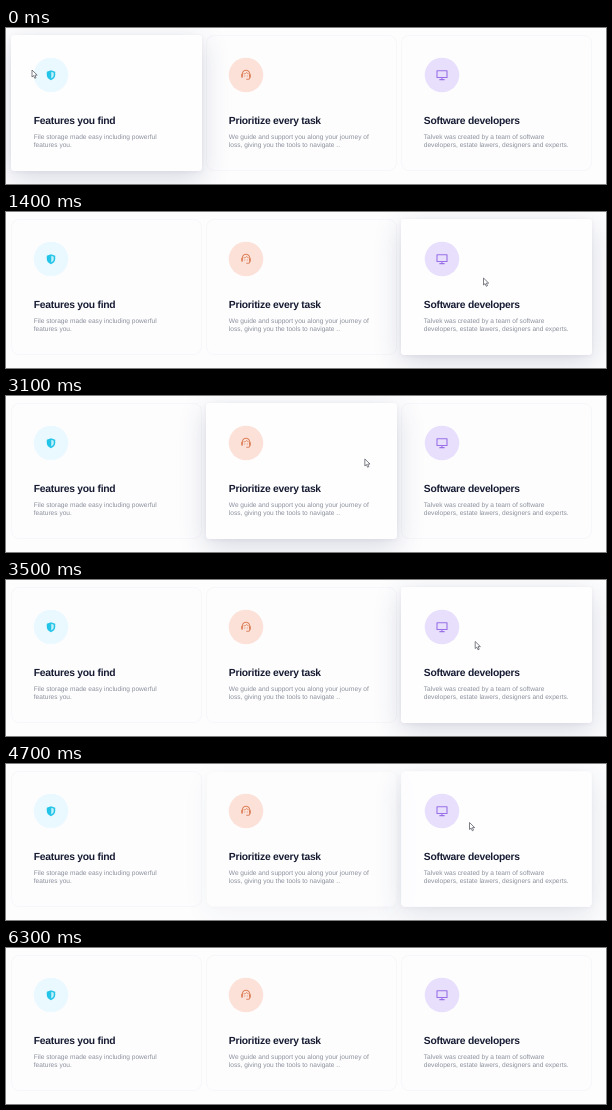
Recreate the animation shown at these times as an HTML page. Size 600 by 156 pixels, loop 6700 ms.

```html
<!DOCTYPE html>
<html lang="en">
<head>
<meta charset="utf-8">
<title>Feature cards</title>
<style>
  html, body { margin: 0; width: 100%; height: 100%; overflow: hidden; background: #fdfdfe; }
  .stage { position: relative; width: 600px; height: 156px; overflow: hidden; }
  .card { position: absolute; top: 7px; width: 191px; height: 136px; box-sizing: border-box; }
  svg { position: absolute; inset: 0; z-index: 20; }
  text { font-family: "Liberation Sans", Arial, sans-serif; text-rendering: geometricPrecision; }
  .title { font-size: 10.3px; font-weight: 700; letter-spacing: -.25px; fill: #171c33; }
  .body { font-size: 6.58px; fill: #8b909b; }
</style>
</head>
<body>
<div class="stage">
  <svg width="600" height="156" viewBox="0 0 600 156">
    <g id="copy"></g>
    <g transform="translate(45 47)">
      <circle r="17.3" fill="#eaf8ff"/>
      <g transform="scale(.9)">
        <path d="M0-5.3 4.7-3.5V0C4.7 2.8 2.6 4.7 0 5.7-2.6 4.7-4.7 2.8-4.7 0V-3.5Z" fill="#22c5e8"/>
        <path d="M.3-3.5 3-2.4V0C3 1.9 1.9 3 .3 3.8Z" fill="#c4f0fb"/>
      </g>
    </g>
    <g transform="translate(240 47)">
      <circle r="17.3" fill="#fce1d8"/>
      <g transform="scale(.9)" fill="none" stroke="#dd845f" stroke-width="1.2" stroke-linecap="round">
        <path d="M-4.2 0V-1A4.2 4.2 0 0 1 4.2-1V3.2C4.2 4.4 3.2 4.8.8 4.8"/>
        <path d="M-4.4-.2V2M4.4-.2V2" stroke-width="2"/>
        <path d="M-2.4-1.3C-.8-1.3.2-1.9.7-2.8 1.2-1.9 1.9-1.4 2.5-1.3M-1.4 1.1h.1M1.4 1.1h.1" stroke-width="1"/>
      </g>
    </g>
    <g transform="translate(436 47)">
      <circle r="17.3" fill="#e7dffc"/>
      <path d="M-5-4.3H5V2.5H-5ZM0 2.5V4.5M-2.6 4.6H2.6" fill="none" stroke="#9a70e8" stroke-width="1.1" stroke-linejoin="round"/>
    </g>
    <path id="cursor" d="M0 0V7L1.6 5.6 2.8 8.3 4 7.7 2.9 5.1H5.2Z" fill="#fff" stroke="#555760" stroke-width=".75" stroke-linejoin="round"/>
  </svg>
</div>
<script>
const LOOP = 6700, STEP = 100, EXIT = 6000;
const FADE = 300, SAMPLES = 15;
const PITCH = 195, WIDTH = 191;

const copy = [
  ["Features you find", "File storage made easy including powerful", "features you."],
  ["Prioritize every task", "We guide and support you along your journey of", "loss, giving you the tools to navigate .."],
  ["Software developers", "Talvek was created by a team of software", "developers, estate lawers, designers and experts."]
];

// Where the pointer rests or turns: [ms, x, y]
const stops = [
  [0, 26, 42], [600, 190, 83], [700, 273, 80], [1400, 477.5, 66], [1500, 477.5, 66],
  [2250, 152.5, 65.5], [2600, 152.5, 65.5], [3450, 476.5, 61.5], [4000, 116, 62],
  [4700, 463.5, 58.5], [5000, 375, 61], [5200, 375, 61], [5400, 450.5, 57],
  [5800, 42, 27], [EXIT, 37, 11]
];

const ease = p => (1 - Math.cos(Math.PI * p)) / 2;
const cardLeft = i => 5 + PITCH * i;

function pointer(t) {
  if (t > EXIT) return null;
  const i = Math.max(1, stops.findIndex(s => s[0] >= t));
  const [t0, x0, y0] = stops[i - 1], [t1, x1, y1] = stops[i];
  const p = ease((t - t0) / (t1 - t0));
  return [x0 + (x1 - x0) * p, y0 + (y1 - y0) * p];
}

function isOver(i, t) {
  const at = pointer(Math.max(0, t));
  return at !== null && at[0] >= cardLeft(i) && at[0] <= cardLeft(i) + WIDTH;
}

// The share of the last FADE ms that the pointer spent over the card.
function lift(i, t) {
  let over = 0;
  for (let k = 0; k < SAMPLES; k++) over += isOver(i, t - FADE * k / SAMPLES);
  return over / SAMPLES;
}

function addText(x, y, kind, words) {
  const el = document.createElementNS("http://www.w3.org/2000/svg", "text");
  el.setAttribute("x", x);
  el.setAttribute("y", y);
  el.setAttribute("class", kind);
  el.textContent = words;
  document.getElementById("copy").append(el);
}

const cards = copy.map(([title, first, second], i) => {
  const x = cardLeft(i) + 22.8;
  addText(x, 95.7, "title", title);
  addText(x, 110.5, "body", first);
  addText(x, 118.9, "body", second);
  const card = document.createElement("div");
  card.className = "card";
  card.style.left = `${cardLeft(i)}px`;
  document.querySelector(".stage").append(card);
  return card;
});
const cursor = document.getElementById("cursor");

function styleCard(card, s) {
  Object.assign(card.style, {
    background: `rgba(254,254,255,${s})`,
    borderRadius: `${8 - 5 * s}px`,
    border: `1px solid rgba(236,237,242,${.4 * (1 - s)})`,
    boxShadow: `0 8px 28px rgba(44,58,98,${.18 * s}), 0 1px 4px rgba(44,58,98,${.06 * s})`,
    zIndex: Math.round(s * 10)
  });
}

function draw(now) {
  const t = Math.floor((now % LOOP) / STEP) * STEP;
  cards.forEach((card, i) => styleCard(card, lift(i, t)));
  const at = pointer(t);
  cursor.style.display = at ? "" : "none";
  if (at) cursor.setAttribute("transform", `translate(${at[0]} ${at[1]})`);
}

const start = performance.now();
function tick() {
  draw(performance.now() - start);
  requestAnimationFrame(tick);
}
tick();
</script>
</body>
</html>
```
